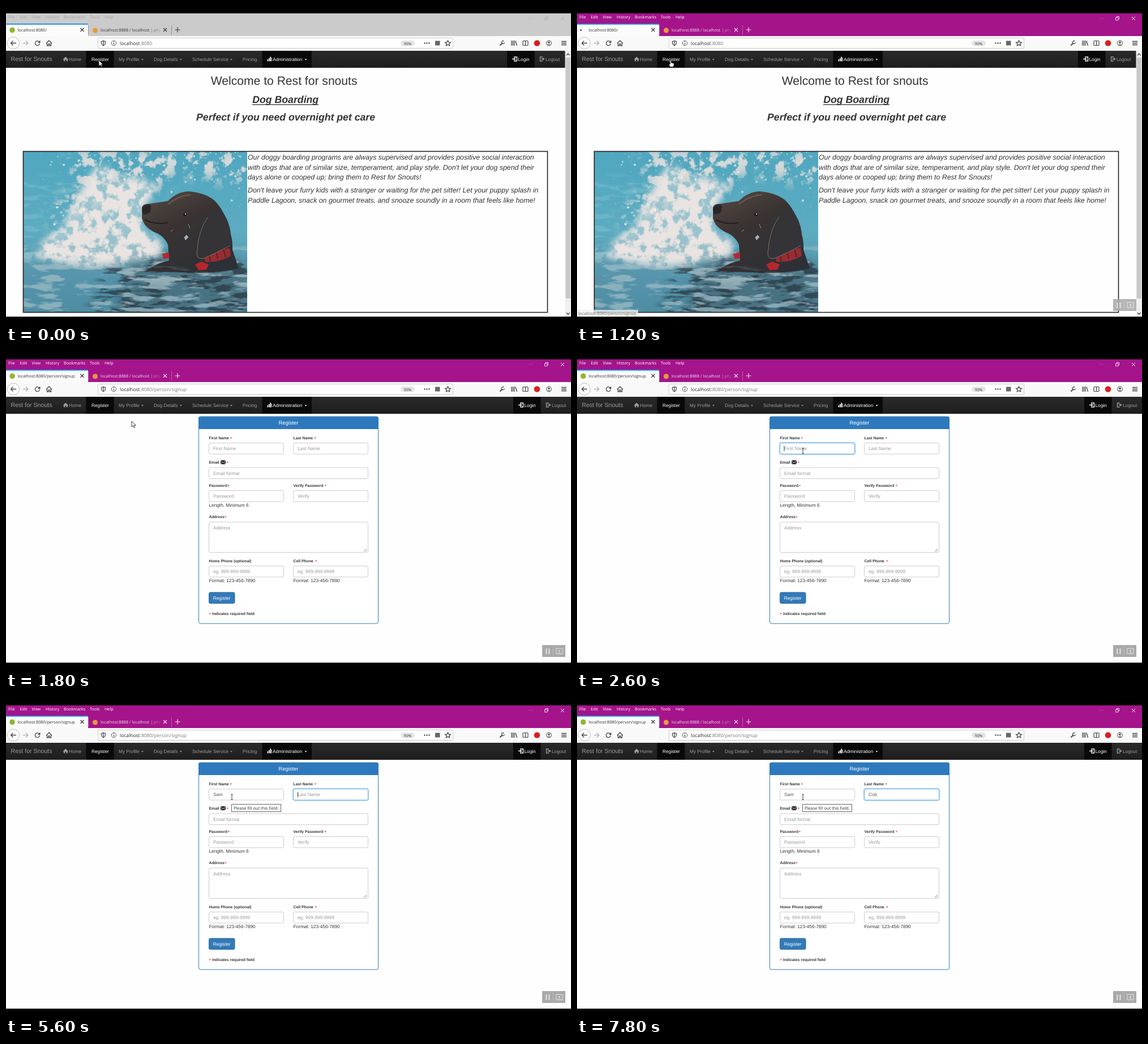
Recreate the animation shown at these times as an HTML page. Size 998 by 561 pixels, loop 8000 ms.

```html
<!DOCTYPE html>
<html lang="en">
<head>
<meta charset="utf-8">
<title>Dog boarding registration</title>
<style>
html, body { margin: 0; width: 100%; height: 100%; overflow: hidden; background: #000; }
svg { display: block; width: 998px; height: 561px; }
text { font-family: "Liberation Sans", Arial, sans-serif; text-rendering: geometricPrecision; white-space: pre; }
.ui { font-family: "Open Sans", "Noto Sans", sans-serif; }
.b { font-weight: bold; }
.i { font-style: italic; }
.line { fill: none; stroke: #444; stroke-width: 1.3; }
</style>
</head>
<body>
<svg id="stage" viewBox="0 0 998 561"></svg>
<script>
const BRAND = "Rest for Snouts";
const text = (x, y, s, size, fill = "#333", cls = "", more = "") =>
  `<text x="${x}" y="${y}" font-size="${size}" fill="${fill}" class="${cls}" ${more}>${s}</text>`;
const mid = 'text-anchor="middle"';
const rect = (x, y, w, h, fill, more = "") =>
  `<rect x="${x}" y="${y}" width="${w}" height="${h}" fill="${fill}" ${more}/>`;
const circle = (x, y, r, fill, more = "") => `<circle cx="${x}" cy="${y}" r="${r}" fill="${fill}" ${more}/>`;
const path = (d, more = 'class="line"') => `<path d="${d}" ${more}/>`;
const fill = c => `fill="${c}"`;
const group = (id, s, more = "") => `<g id="${id}" ${more}>${s}</g>`;

function randomizer(seed) {
  return () => (seed = (seed * 16807) % 2147483647) / 2147483647;
}

// Breaks a shape into ragged flecks of its own colour
const flecks = (id, freq, gain, cut, blur, seed) => `<filter id="${id}" color-interpolation-filters="sRGB">
  <feTurbulence type="fractalNoise" baseFrequency="${freq}" numOctaves="4" seed="${seed}"/>
  <feColorMatrix values="0 0 0 0 0 0 0 0 0 0 0 0 0 0 0 ${gain} 0 0 0 ${-gain * cut}" result="mask"/>
  <feGaussianBlur in="SourceGraphic" stdDeviation="${blur}"/><feComposite operator="in" in2="mask"/></filter>`;

const defs = `<defs>
  <linearGradient id="water" x2="0" y2="1"><stop offset="0" stop-color="#4fa7bf"/>
    <stop offset=".5" stop-color="#5cabc1"/><stop offset=".75" stop-color="#5796ac"/><stop offset="1" stop-color="#4d8ca2"/></linearGradient>
  <linearGradient id="bar" x2="0" y2="1"><stop offset="0" stop-color="#2a2a2a"/><stop offset="1" stop-color="#1e1e1e"/></linearGradient>
  <linearGradient id="fur" x2=".6" y2="1"><stop offset="0" stop-color="#574b45"/><stop offset=".45" stop-color="#393332"/>
    <stop offset="1" stop-color="#2d3036"/></linearGradient>
  <linearGradient id="tabFade" gradientUnits="userSpaceOnUse" x1="252" x2="273"><stop offset="0" stop-color="#fff"/>
    <stop offset="1" stop-color="#fff" stop-opacity=".15"/></linearGradient>
  <mask id="tabMask"><rect x="160" y="32" width="113" height="20" fill="url(#tabFade)"/></mask>
  <clipPath id="photoClip"><rect x="31" y="257" width="395" height="283"/></clipPath>
  <filter id="soft"><feGaussianBlur stdDeviation="4"/></filter>
  <filter id="wide"><feGaussianBlur stdDeviation="12"/></filter>
  ${flecks("spray", ".06", 9, .5, 12, 4)}${flecks("foam", ".05", 7, .38, 7, 9)}
  ${flecks("ripple", ".02 .09", 8, .52, 6, 3)}${flecks("shade", ".025 .1", 8, .5, 10, 12)}</defs>`;

// Title bar and tabs for a focused or unfocused window
function frame(bg, menu, tab, buttons, dim) {
  const items = [["File", 4], ["Edit", 24.5], ["View", 45.5], ["History", 70], ["Bookmarks", 102], ["Tools", 148], ["Help", 174]];
  return rect(0, 13, 998, 40, bg) +
    items.map(([s, x]) => text(x, 22.1, s, 7.25, menu, "ui")).join("") +
    path("M922 22h9", `stroke="${dim}"`) +
    path("M951.5 20.5h4.5v4.5h-4.5zM953 20v-1.5h4.5v4.5h-1", `fill="none" stroke="${buttons}" stroke-width=".9"`) +
    path("M980 19l6 6m0-6l-6 6", `stroke="${buttons}"`) +
    circle(157.5, 43, 4.5, "#e69a3c") +
    `<g mask="url(#tabMask)">${text(167, 45, "localhost:8888 / localhost | php", 7.3, tab, "ui")}</g>` +
    path("M278 39l6 6m0-6l-6 6M303 37.5v9m-4.5-4.5h9", `stroke="${tab}" stroke-width="1.2"`) +
    path("M145.5 34v17M292.5 34v17", `stroke="${tab}" opacity=".35"`);
}

function toolbar() {
  const dots = [739.5, 743.5, 747.5].map(x => circle(x, 65.5, 1.2, "#444")).join("");
  return rect(0, 31, 145, 23, "#fbfbfb") + rect(0, 31, 145, 1.8, "#1688f0") +
    path("M131.5 39l6 6m0-6l-6 6", 'stroke="#333" stroke-width="1.2"') +
    rect(0, 53, 998, 26, "#f9f9fa") +
    circle(13, 65.5, 10.5, "#fff", 'stroke="#bbb"') +
    path("M18 65.5H8.5m4-4l-4 4 4 4") +
    path("M30 65.5h9m-4-4l4 4-4 4", 'class="line" style="stroke:#b5b5b5"') +
    path("M71 66l5-5 5 5M72.5 65.5v4.5h2.5v-3h2v3h2.5v-4.5") +
    rect(162.5, 56.5, 627, 18, "#fff", 'stroke="#ccc" rx="1"') +
    path("M168.5 62.5l3.5-1 3.5 1v3q-.5 3-3.5 4.5-3-1.5-3.5-4.5zM172 62v7") +
    circle(190.5, 65.5, 4.2, "none", 'stroke="#555"') + path("M190.5 65v3M190.5 62.6v1.2") +
    rect(697, 61, 25, 9.5, "#e4e4e6", 'rx="4.7"') + text(709.5, 68.5, "90%", 6.8, "#333", "ui", mid) +
    dots + rect(758, 61.5, 8.5, 8, "#666") +
    path("M780.5 60.8l1.4 3.2 3.5.3-2.7 2.3.9 3.4-3.1-1.8-3.1 1.8.9-3.4-2.7-2.3 3.5-.3z") +
    path("M872.5 69.5l4-4", 'class="line" style="stroke-width:2"') + path("M879.5 62a2.5 2.5 0 1 0 1 2.5") +
    path("M893 61v9M895.5 61v9M898 61v9M900 61.5l2.5 8.5") +
    rect(913, 61.5, 9, 8, "none", 'stroke="#444" stroke-width="1.2" rx="1"') + path("M917.5 62v7.5") +
    circle(938, 65.5, 5.3, "#d81f1f") +
    circle(959, 65.5, 4.5, "none", 'stroke="#444"') + circle(959, 64.3, 1.7, "#444") + path("M956 68.5q3-2.5 6 0z", fill("#444")) +
    path("M981 62.5h9M981 65.5h9M981 68.5h9");
}

const caret = x => path(`M${x - 2} 93.5h4l-2 2.3z`, fill("currentColor"));

function navbar() {
  const grey = "#9d9d9d", size = 8.25, y = 96.9;
  const item = (x, s, c = grey) => text(x, y, s, size, c);
  return rect(0, 79, 998, 30, "url(#bar)") + rect(141.5, 79, 49, 30, "#090909") + rect(452.5, 79, 87.5, 30, "#090909") +
    text(8.5, 97.2, BRAND, 10.6, grey) +
    path("M100.5 94l4.8-4.5 4.8 4.5h-1.3v3.5h-2.3v-2.5h-2.3v2.5h-2.4v-3.5z", fill(grey)) +
    item(111, "Home") + item(151, "Register", "#fff") + item(199, "My Profile") + item(261, "Dog Details") +
    item(329, "Schedule Service") + item(418, "Pricing") + item(471, "Administration", "#fff") +
    `<g color="${grey}">${[241, 309, 398].map(caret).join("")}</g><g color="#fff">${caret(529.5)}</g>` +
    path("M461.5 94h1.6v3.5h-1.6zM464 92h1.6v5.5H464zM466.3 89.5h1.6v8h-1.6zM468.5 91h1v6.5h-1z", fill("#fff")) +
    group("account", rect(885, 79, 48.5, 30, "#090909") + item(904.5, "Login", "#fff") + item(953, "Logout") +
      path("M897 90h5.5v7H897M894 93.5h5.5m-2-2l2 2-2 2", 'class="line" style="stroke:#fff"') +
      path("M948 90h-4.5v7h4.5M945.5 93.5h5m-2-2l2 2-2 2", `class="line" style="stroke:${grey}"`));
}

function photo() {
  const rnd = randomizer(77);
  let drops = "";
  for (let n = 0; n < 260; n++) {
    const x = 60 + rnd() * 360, y = 258 + rnd() ** 1.7 * 185;
    drops += circle(x.toFixed(1), y.toFixed(1), (.4 + 1.8 * rnd() ** 3).toFixed(1), "#f0eeeb", `opacity="${(.4 + rnd() * .5).toFixed(2)}"`);
  }
  const splash = "M48 440Q70 405 105 390L122 345 140 315 165 278 195 300 232 305 268 318 248 345 238 370 246 395 276 420 270 440 232 452 150 458 85 450z";
  return `<g clip-path="url(#photoClip)">` + rect(31, 257, 395, 283, "url(#water)") +
    path("M215 450Q330 420 430 460V545H190z", 'fill="#40545f" opacity=".5" filter="url(#wide)"') +
    path("M180 445H440V560H140z", 'fill="#2b3c47" filter="url(#shade)" opacity=".8"') +
    rect(10, 425, 440, 130, "#9dbbc5", 'filter="url(#ripple)" opacity=".75"') +
    rect(10, 300, 150, 150, "#83c3d1", 'filter="url(#ripple)" opacity=".45"') +
    path("M110 250H440V305Q390 320 340 300T270 330Q200 300 180 330T60 385L120 320z", 'fill="#e6dfdc" filter="url(#spray)" opacity=".9"') +
    path(splash, 'fill="#d8dcdc" opacity=".5" filter="url(#soft)"') +
    path(splash, 'fill="#e9e4e1" filter="url(#foam)"') + drops +
    path("M240 357Q240 349 252 349L286 344Q302 328 322 327 350 329 367 342 386 360 393 390 401 410 400 430L411 463Q365 474 310 470L246 468Q267 453 288 449L286 421Q278 404 262 399 243 389 240 374z", fill("url(#fur)")) +
    path("M240 357q4-8 14-7 4 5 0 14-6 5-12 3z", fill("#2a2628")) +
    path("M245 377Q265 387 286 382", 'fill="none" stroke="#201e20" stroke-width="2"') +
    path("M286 350Q305 334 327 333", 'fill="none" stroke="#80695a" stroke-width="2" opacity=".7"') +
    circle(316, 368, 3, "#1b1a1c") + circle(317, 367, 1.2, "#b9bec2") +
    path("M350 437Q373 430 395 427L397 441Q376 453 352 451z", fill("#9a2c31")) +
    path("M358 436l3 14M371 432l3 14M384 429l4 14", 'stroke="#4e272c" stroke-width="2"') +
    path("M276 437l12-2v10l-10 1zM334 456l11-5 13 5-4 9-14 1z", fill("#b8262d")) +
    path("M357 368Q340 394 337 436 337 448 350 445 371 436 397 421 400 388 383 364 370 352 357 368z", fill("#343338")) +
    path("M357 372Q340 394 337 436 337 448 350 445 371 436 395 423", 'fill="none" stroke="#85715f"') +
    path("M315 408l4-4 3 4-5 5zM291 398l4-3M322 385l3 7", 'fill="#adb1b3" stroke="#8e9699"') +
    path("M200 472Q260 455 315 470T440 462V490H200z", 'fill="#9db3bc" filter="url(#ripple)" opacity=".8"') + "</g>";
}

function home() {
  const lines = ["Our doggy boarding programs are always supervised and provides positive social interaction",
    "with dogs that are of similar size, temperament, and play style. Don't let your dog spend their",
    `days alone or cooped up; bring them to ${BRAND}!`,
    "Don't leave your furry kids with a stranger or waiting for the pet sitter! Let your puppy splash in",
    "Paddle Lagoon, snack on gourmet treats, and snooze soundly in a room that feels like home!"];
  const ys = [271, 288.5, 306, 329.3, 346.8];
  return text(361.8, 139.2, "Welcome to " + BRAND.replace("Snouts", "snouts"), 21.1) +
    text(493.7, 171, "Dog Boarding", 17.7, "#333", "b i", mid) + rect(435, 173.3, 117, 1.3, "#333") +
    text(494, 202.3, "Perfect if you need overnight pet care", 17.66, "#333", "b i", mid) +
    photo() + rect(30.5, 256.5, 926, 284, "none", 'stroke="#222" stroke-width="1.6"') +
    lines.map((s, n) => text(427, ys[n], s, 12.37, "#333", "i")).join("") +
    rect(987.5, 79, 10.5, 469, "#f0f0f0") + rect(988.5, 91, 8.5, 425, "#c9c9c9") +
    path("M990 87l2.8-3 2.8 3M990 541l2.8 3 2.8-3");
}

const field = (x, y, w, h, hint) => rect(x, y, w, h, "#fff", 'stroke="#ccc" rx="2.5"') +
  (hint ? text(x + 7.5, y + 12.5, hint, 8.25, "#999") : "");
const label = (x, y, s, star) => text(x, y + 2.4, s, 6.85, "#333", "b") +
  (star ? text(star - 1.6, y + 4, "*", 9, "#f02020") : "");

function form() {
  const L = 358.5, R = 507.5, W = 132, FULL = 281;
  return rect(340.5, 114, 317, 365, "#fff", 'stroke="#337ab7" rx="3"') + path("M340 136v-19q0-3 3-3h312q3 0 3 3v19z", fill("#2e79bd")) +
    text(499, 128, "Register", 9.4, "#fff", "", mid) +
    label(L, 152, "First Name", 397) + field(L, 160.5, W, 19.5) + label(R, 152, "Last Name", 546) + field(R, 160.5, W, 19.5) +
    label(L, 195, "Email", 391) + rect(379, 191, 9, 7, "#222", 'rx="1"') + path("M379 191.5l4.5 3.8 4.5-3.8M379 198l3-3M388 198l-3-3", 'fill="none" stroke="#fff" stroke-width=".8"') +
    field(L, 204, FULL, 19.5, "Email format") +
    label(L, 236, "Password", 393) + field(L, 244.5, W, 19.5, "Password") +
    label(R, 236, "Verify Password", 564) + field(R, 244.5, W, 19.5, "Verify") + text(358.5, 273.3, "Length, Minimum 6", 8.25) +
    label(L, 291, "Address", 387.5) + field(L, 300, FULL, 53.5, "Address") + path("M632 352l5-5M635 352l2-2", 'stroke="#888"') +
    label(L, 369, "Home Phone (optional)") + field(L, 377.5, W, 19.5, "eg. 999-999-9999") +
    label(R, 369, "Cell Phone", 547.5) + field(R, 377.5, W, 19.5, "eg. 999-999-9999") +
    [L, R].map(x => text(x, 406, "Format: 123-456-7890", 8.25)).join("") +
    rect(358.5, 424, 45.5, 19.5, "#337ab7", 'stroke="#2e6da4" rx="2.5"') + text(381.2, 436.8, "Register", 8.25, "#fff", "", mid) +
    label(364, 461.5, "Indicates required field", 360) +
    group("focus", rect(0, 160.5, W, 19.5, "none", 'stroke="#66afe9" stroke-opacity=".4" stroke-width="4" rx="3"') +
      rect(0, 160.5, W, 19.5, "#fff", 'stroke="#66afe9" rx="2.5"')) +
    text(366, 173, "", 8.25, "#555", "", 'id="first"') + text(515, 173, "", 8.25, "#555", "", 'id="last"') +
    group("caret", rect(0, 165.5, .9, 9.5, "#333")) +
    group("tip", rect(398.5, 187.5, 87, 13, "#fff", 'stroke="#666"') + text(402, 196.9, "Please fill out this field.", 7.45, "#333", "ui"));
}

const edge = 'fill="#fff" stroke="#111" stroke-width=".8"';
document.getElementById("stage").innerHTML = defs + rect(0, 0, 998, 561, "#000") + rect(0, 79, 998, 469, "#fefefe") +
  group("idle", frame("#cbcbcb", "#a4a4a4", "#3b3b3b", "#b3b3b3", "#c0c0c0")) +
  group("active", frame("#a5148b", "#fff", "#f1dcec", "#f4e4f1", "#b138a0")) + toolbar() +
  text(20.5, 45, "", 7.3, "#333", "ui", 'id="tabTitle"') +
  text(201, 68.8, `<tspan fill="#222">localhost</tspan>:8080<tspan id="route"></tspan>`, 8.5, "#777", "ui") +
  group("icon", circle(11, 42.5, 4.8, "#91b52f")) + group("dot", circle(0, 42.5, 1.5, "#444")) +
  group("burst", circle(11, 41.5, 9.5, "#8fc5fa")) +
  group("reload", path("M58.5 63a4 4 0 1 0 1 3") + path("M60.5 60.5v4.5h-4.5z", fill("#444"))) +
  group("stop", path("M51 61.5l8 8m0-8l-8 8", 'stroke="#999" stroke-width="1.3"')) + navbar() +
  group("home", home()) + group("form", form()) +
  group("status", rect(0, 536, 108, 11, "#f0f0f0") + text(2.5, 544.5, "localhost:8080/person/signup", 7.35, "#555", "ui")) +
  group("recorder", rect(947, 517, 41, 21, "#a9a9a9") + path("M954.5 523v10M959.5 523v10", 'stroke="#d7d7d7" stroke-width="2.5"') +
    path("M966.5 520v15", 'stroke="#bdbdbd"') + rect(972, 523, 11, 9.5, "none", 'stroke="#d7d7d7" stroke-width="1.3"') +
    path("M974.5 531q3-3 6 0zM976 526h3v2.5h-3z", fill("#d7d7d7"))) +
  group("arrow", path("M0 0v10l2.4-2.2 1.7 3.6 1.6-.7-1.7-3.5h3.3z", edge)) +
  group("hand", path("M-2.5 5.5L-3.5 2q1-1.5 2 0v-7q1-1.5 2 0v4l4 1q1 .5.8 2l-1 4.5h-5z", edge)) +
  group("beam", path("M-1.8-4.5h3.6M0-4.5v9M-1.8 4.5h3.6", 'stroke="#333" stroke-width=".9"'));

const el = id => document.getElementById(id);
const show = (id, on) => el(id).setAttribute("visibility", on ? "visible" : "hidden");
const move = (id, x, y = 0) => el(id).setAttribute("transform", `translate(${x} ${y})`);
const within = (t, ...spans) => spans.some(([a, b]) => t >= a && t < b);
const pick = (t, steps) => steps.reduce((v, [at, next]) => t >= at ? next : v, "");

// Text shown in each name field from the given time on
const firstSteps = [[1400, "First Name"], [3800, "S"], [4400, "Sa"], [5000, "Sam"]];
const lastSteps = [[1400, "Last Name"], [7000, "C"], [7400, "Co"], [7800, "Cob"]];
const mouse = [[0, [164, 96]], [200, [166, 101]], [1600, [175, 106]], [1800, [222, 122]], [2000, [310, 150]], [2200, [378, 170]], [2400, [399, 174.5]]];

function setField(id, value) {
  el(id).textContent = value;
  el(id).setAttribute("fill", value.endsWith("Name") ? "#999" : "#555");
}

let shown = -1;
function draw(now) {
  const t = Math.floor((now % 8000) / 200) * 200;
  if (t === shown) return;
  shown = t;
  const signup = t >= 1400, loading = within(t, [1000, 1400]);
  show("idle", t < 200);
  show("active", t >= 200);
  show("home", !signup);
  show("form", signup);
  el("tabTitle").textContent = "localhost:8080/" + (signup ? "person/signup" : "");
  el("route").textContent = signup ? "/person/signup" : "";
  move("account", signup ? 11 : 0);
  show("dot", loading);
  move("dot", t < 1200 ? 14 : 7);
  show("burst", t === 1400);
  show("icon", !loading && t !== 1400);
  show("stop", t === 1400);
  show("reload", t !== 1400);
  show("status", within(t, [1000, 1800]));
  el("status").setAttribute("opacity", signup ? 1 : .8);
  show("recorder", t >= 1000);
  el("recorder").setAttribute("opacity", signup ? 1 : .85);

  setField("first", pick(t, firstSteps));
  setField("last", pick(t, lastSteps));
  const onLast = t >= 5600;
  show("focus", t >= 2600);
  move("focus", onLast ? 507.5 : 358.5);
  show("caret", within(t, [2600, 3200], [3600, 3800], [5600, 6000], [6600, 7000]));
  move("caret", onLast ? 515 : 365.5);
  show("tip", t >= 3200);

  const kind = t < 200 ? "arrow" : t < 1600 ? "hand" : t < 2400 ? "arrow" : "beam";
  for (const id of ["arrow", "hand", "beam"]) show(id, id === kind);
  move(kind, ...pick(t, mouse));
}

const start = performance.now();
function tick() {
  draw(performance.now() - start);
  requestAnimationFrame(tick);
}
tick();
</script>
</body>
</html>
```
